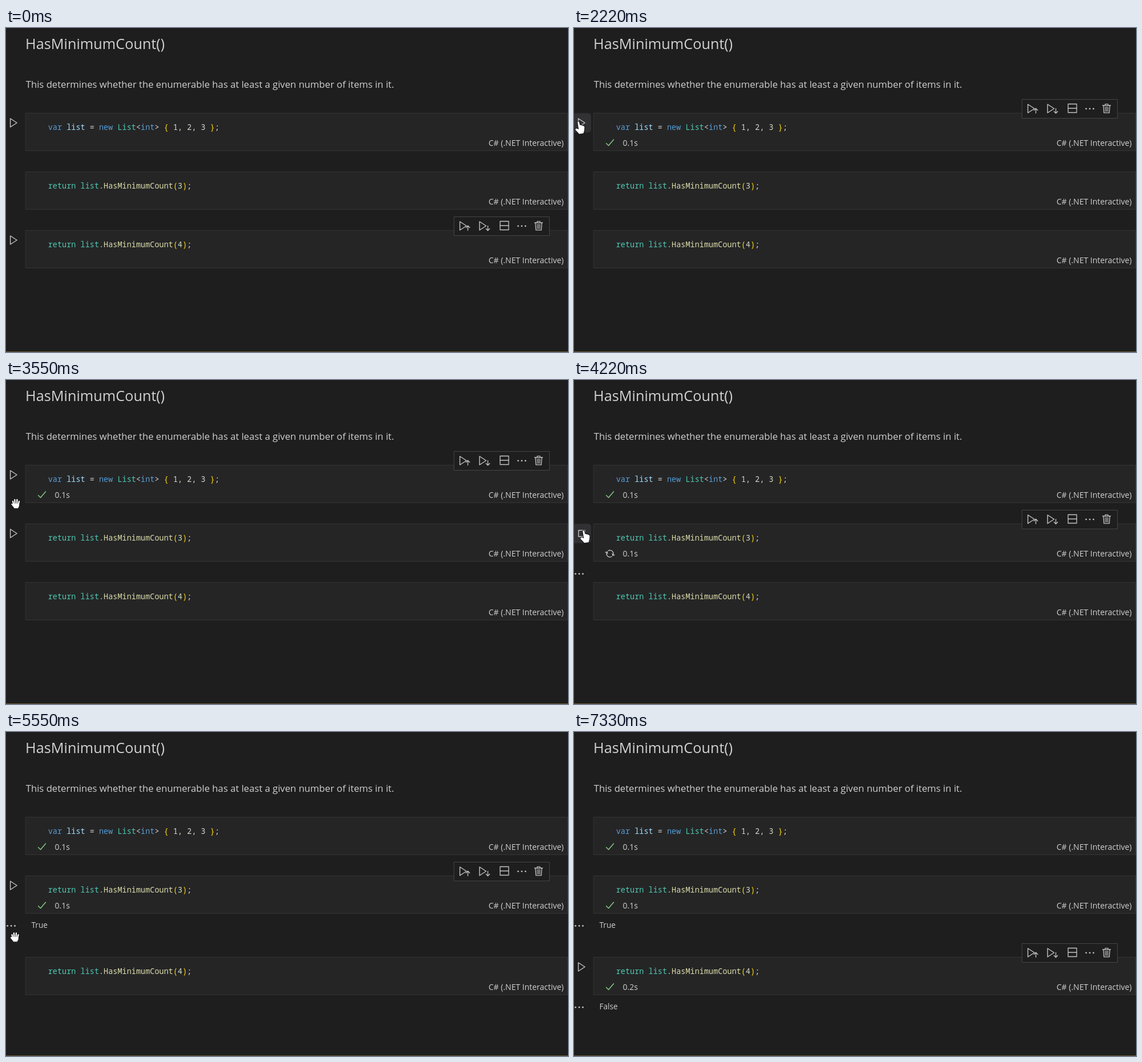
An HTML page with a canvas that plays this animation: 985 by 569 pixels, repeating every 8 s.

```html
<!DOCTYPE html>
<html lang="en">
<head>
<meta charset="utf-8">
<title>Notebook cells</title>
<style>
  html, body { margin: 0; width: 100%; height: 100%; overflow: hidden; background: #1e1e1e; }
  canvas { display: block; width: 985px; height: 569px; }
</style>
</head>
<body>
<canvas id="stage"></canvas>
<script>
const W = 985, H = 569, LOOP = 8000;
const SANS = '"Open Sans", "Noto Sans", sans-serif';
const MONO = '"Noto Sans Mono", "DejaVu Sans Mono", monospace';
const INK = '#d0d0d0', ICON = '#c5c5c5';
const BLUE = '#569cd6', TEAL = '#4ec9b0', SKY = '#9cdcfe', GOLD = '#ffd700',
      CALL = '#dcdcaa', PLAIN = '#d4d4d4', NUM = '#ced9c6';

const canvas = document.getElementById('stage');
const ctx = canvas.getContext('2d');
const ratio = window.devicePixelRatio || 1;
canvas.width = W * ratio;
canvas.height = H * ratio;

const countCall = n => [
  ['return list', TEAL], ['.', PLAIN], ['HasMinimumCount', CALL],
  ['(', GOLD], [n, NUM], [')', GOLD], [';', PLAIN]
];

// click: focus moves here; start/done: execution; output: result is shown
const cells = [
  { top: 149.5, click: 1660, start: 1770, done: 2110, time: '0.1s',
    code: [['var ', BLUE], ['list', SKY], [' = ', PLAIN], ['new ', BLUE], ['List', TEAL],
           ['<', PLAIN], ['int', BLUE], ['> ', PLAIN], ['{ ', GOLD], ['1', NUM], [', ', PLAIN],
           ['2', NUM], [', ', PLAIN], ['3', NUM], [' }', GOLD], [';', PLAIN]],
    hover: [[0, 3550]], button: [[1440, 2880]] },
  { top: 252.5, click: 4000, start: 4110, done: 4330, time: '0.1s', output: 4440, result: 'True',
    code: countCall('3'), hover: [[3550, 5660]], button: [[4000, 5220]] },
  { top: 355.5, click: 6110, start: 6220, done: 6440, time: '0.2s', output: 6550, result: 'False',
    code: countCall('4'), hover: [[5660, 7000]], button: [[5880, 6880]] }
];

// time, x, y, and the shape used from that time on
const pointer = [
  [1220, 60, 188, 'arrow'], [1330, 30, 176, 'arrow'], [1440, 8, 164, 'hand'],
  [2690, 8, 164, 'hand'], [2770, 8, 186, 'grab'], [2880, 7, 205, 'grab'],
  [3550, 17, 217, 'grab'], [3660, 17, 241, 'grab'], [3770, 17, 264, 'hand'],
  [5030, 17, 264, 'hand'], [5110, 14, 305, 'grab'], [5220, 14, 315, 'grab'],
  [5880, 17, 405, 'hand'], [6800, 17, 405, 'hand'], [6880, 10, 452, 'grab'], [7000, 0, 460, 'none']
];

const shapes = {
  arrow: new Path2D('M0 0V16L4 12.5L6.5 18L9 17L6.5 11.5H11.5Z'),
  hand: new Path2D('M-1.8 1.5Q-.5-.5 1 1L2.2 6.5Q4 5.500 5 7.200Q7 6.300 8 8Q10 7.500 10.400 10L10 16L8.500 21' +
                   'L1 22Q-2 18.500-5.500 15Q-6 12-3 12.500L.3 14Z'),
  fingers: new Path2D('M-3.5 2L-5-4M-1 1L-1.7-7M2 1L2.4-7M4.5 2L6-4M-3 5L-6.5 1'),
  palm: new Path2D('M-5 0H6.200L6 4L4 8H-2.500L-5 4Z')
};

const within = (t, spans) => spans.some(([from, to]) => t >= from && t < to);

function text(str, x, y, size, color = INK, family = SANS, weight = 400) {
  ctx.font = `${weight} ${size}px ${family}`;
  ctx.fillStyle = color;
  ctx.fillText(str, x, y);
  return ctx.measureText(str).width;
}

function line(points, color = ICON, width = 1.3, closed = false) {
  ctx.beginPath();
  points.forEach(([x, y]) => ctx.lineTo(x, y));
  if (closed) ctx.closePath();
  ctx.strokeStyle = color;
  ctx.lineWidth = width;
  ctx.stroke();
}

function box(x, y, w, h, fill, border) {
  ctx.fillStyle = fill;
  ctx.fillRect(x, y, w, h);
  ctx.strokeStyle = border;
  ctx.lineWidth = 1;
  ctx.strokeRect(x, y, w, h);
}

function dots(x, y, gap) {
  ctx.fillStyle = ICON;
  for (let i = 0; i < 3; i++) {
    ctx.beginPath();
    ctx.arc(x + i * gap, y, 1.4, 0, 7);
    ctx.fill();
  }
}

const triangle = (x, y) => line([[x, y - 7.5], [x + 11.5, y], [x, y + 7.5]], ICON, 1.4, true);

function smallArrow(x, y, dir) {
  line([[x, y - 4 * dir], [x, y + 4 * dir]]);
  line([[x - 3.2, y + dir], [x, y + 4.2 * dir], [x + 3.2, y + dir]]);
}

function toolbar(top) {
  ctx.save();
  ctx.translate(785, top - 24.5);
  box(0.5, 0.5, 167, 33, '#1e1e1e', '#454545');
  triangle(10.5, 16.5);
  smallArrow(24.5, 20.5, -1);
  triangle(45, 16.5);
  smallArrow(59.5, 20.5, 1);
  ctx.strokeStyle = ICON;
  ctx.lineWidth = 1.3;
  ctx.strokeRect(81, 8.5, 15, 15);
  line([[81, 16], [96, 16]]);
  dots(112.6, 16.8, 6.4);
  line([[141.5, 11], [155.5, 11]]);
  line([[146, 10.5], [146, 8.5], [151, 8.5], [151, 10.5]], ICON, 1.2);
  line([[143, 11.5], [143.7, 23.8], [153.3, 23.8], [154, 11.5]]);
  for (const x of [146.2, 148.5, 150.8]) line([[x, 13.5], [x, 21.5]], ICON, 1.1);
  ctx.restore();
}

function spinner(x, y, angle) {
  ctx.save();
  ctx.translate(x, y);
  ctx.rotate(angle);
  for (let i = 0; i < 2; i++) {
    ctx.beginPath();
    ctx.arc(0, 0, 6, -2.6, 0.1);
    ctx.strokeStyle = ICON;
    ctx.lineWidth = 1.3;
    ctx.stroke();
    line([[3.6, -1.6], [6, 0.7], [8.2, -1.6]], ICON, 1.2);
    ctx.rotate(Math.PI);
  }
  ctx.restore();
}

function runButton(cell, t, focused) {
  if (within(t, cell.button)) {
    ctx.fillStyle = '#313133';
    ctx.beginPath();
    ctx.roundRect(-6, cell.top, 36, 34, 5);
    ctx.fill();
  }
  const y = cell.top + 17;
  if (t >= cell.start && t < cell.done) {
    ctx.strokeStyle = ICON;
    ctx.lineWidth = 1.4;
    ctx.strokeRect(8, y - 5.5, 11, 11);
  } else if (focused || within(t, cell.hover)) {
    triangle(7.6, y);
  }
}

function drawCell(cell, t, focused, top) {
  box(34.5, top, 950, 66, '#252526', '#343438');
  let x = 73.7;
  for (const [str, color] of cell.code) x += text(str, x, top + 29, 13.54, color, MONO, 500);
  ctx.textAlign = 'right';
  text('C# (.NET Interactive)', 977.5, top + 57.5, 14);
  ctx.textAlign = 'left';
  if (t >= cell.start) {
    const y = top + 52.5;
    const done = t >= cell.done;
    if (done) line([[56.5, y + 0.5], [60.5, y + 4.5], [69.5, y - 6]], '#89d185', 1.4);
    else spinner(63, y, (t - cell.start) / 1500 * 2 * Math.PI);
    text(done ? cell.time : t < cell.start + 100 ? '0.0s' : '0.1s', 85.5, top + 57.5, 14);
    if (cell.result) dots(2.7, top + 88, 6.4);
  }
  if (t >= cell.output) text(cell.result, 44.5, top + 91.8, 13.6);
  runButton({ ...cell, top }, t, focused);
}

function tooltip(x, y, alpha) {
  ctx.globalAlpha = alpha;
  box(x, y, 171, 25, '#252526', '#a0a0a0');
  text('Execute Cell (Ctrl+Alt+Enter)', x + 7.5, y + 17, 11.9);
  ctx.globalAlpha = 1;
}

function drawPointer(t) {
  const i = pointer.findLastIndex(key => t >= key[0]);
  if (i < 0 || pointer[i][3] === 'none') return;
  const [t0, x0, y0, shape] = pointer[i];
  const [t1, x1, y1] = pointer[i + 1];
  const k = (t - t0) / (t1 - t0);
  ctx.save();
  ctx.translate(x0 + (x1 - x0) * k, y0 + (y1 - y0) * k);
  ctx.fillStyle = '#ffffff';
  ctx.strokeStyle = '#111111';
  if (shape === 'grab') {
    ctx.lineWidth = 4;
    ctx.stroke(shapes.fingers);
    ctx.strokeStyle = '#ffffff';
    ctx.lineWidth = 2.4;
    ctx.stroke(shapes.fingers);
    ctx.fill(shapes.palm);
  } else {
    ctx.lineWidth = 2;
    ctx.stroke(shapes[shape]);
    ctx.fill(shapes[shape]);
  }
  ctx.restore();
}

function draw(t) {
  ctx.setTransform(ratio, 0, 0, ratio, 0, 0);
  ctx.lineJoin = ctx.lineCap = 'round';
  ctx.fillStyle = '#1e1e1e';
  ctx.fillRect(0, 0, W, H);
  ctx.fillStyle = '#6a5c34';
  ctx.fillRect(0, 568, W, 1);

  text('HasMinimumCount()', 34, 37, 25.25);
  text('This determines whether the enumerable has at least a given number of items in it.', 34.7, 105, 16.68);

  const focus = t < cells[0].click ? 2 : cells.findLastIndex(cell => t >= cell.click);
  const tops = cells.map((cell, i) => cell.top + (i === 2 && t >= cells[1].output ? 40 : 0));
  cells.forEach((cell, i) => drawCell(cell, t, i === focus, tops[i]));
  toolbar(tops[focus]);

  if (t >= 2440 && t < 2770) tooltip(17.5, 178.5, t < 2550 ? 0.5 : 1);
  if (t >= 4880 && t < 5220) tooltip(26.5, 279.5, 1);
  drawPointer(t);
}

const begin = performance.now();
function tick() {
  draw((performance.now() - begin) % LOOP);
  requestAnimationFrame(tick);
}
tick();
</script>
</body>
</html>
```
